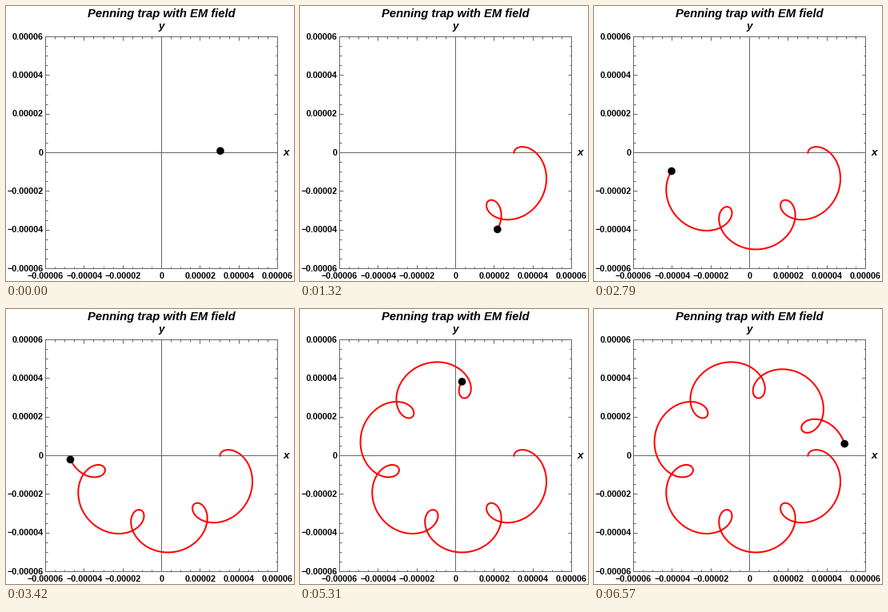
Animation of 360 by 344 pixels, one loop 6.6 s. Source, as a matplotlib script:

```python
import numpy as np
import matplotlib.pyplot as plt
from matplotlib.animation import FuncAnimation
from matplotlib.patches import Circle

W, H, DPI = 360, 344, 100
FRAMES, INTERVAL = 220, 30
X0, Y0, HALF = 194, 183, 145          # plot centre and half-size in pixels
ORIGIN = X0 + 0.62, Y0 + 0.62         # pixel centre of the crossing axes
GREY = "#666666"

# Magnetron drift plus the faster cyclotron motion
R_SLOW, R_FAST = 97.05, 24.25
W_SLOW, W_FAST = np.radians([1.6255, 1.6255 + 10.525])

plt.rcParams["font.family"] = "Liberation Sans"


def pt(px):
    return px * 72 / DPI


def orbit(t):
    """Pixel position of the particle at time t."""
    z = R_SLOW * np.exp(-1j * W_SLOW * t) - R_FAST * np.exp(-1j * W_FAST * t)
    return ORIGIN[0] + z.real, ORIGIN[1] - z.imag


fig = plt.figure(figsize=(W / DPI, H / DPI), dpi=DPI, facecolor="white")
ax = fig.add_axes([0, 0, 1, 1])
ax.set(xlim=(0, W), ylim=(H, 0))
ax.axis("off")


def line(x, y):
    ax.plot(x, y, color=GREY, lw=pt(1), solid_capstyle="butt", zorder=1)


def label(x, y, s, size, ha="center", style="normal"):
    ax.text(x, y, s, fontsize=pt(size), ha=ha, va="baseline",
            weight="bold", style=style, color="black")


L, R, T, B = X0 - HALF, X0 + HALF, Y0 - HALF, Y0 + HALF
line([L, R, R, L, L], [T, T, B, B, T])
line([L, R], [Y0, Y0])
line([X0, X0], [T, B])

for k in range(-12, 13):
    d = k * HALF / 12
    major = k % 4 == 0
    size = 4.5 if major else 2.5
    for edge, s in ((L, size), (R, -size)):
        line([edge, edge + s], [Y0 - d] * 2)
    for edge, s in ((T, size), (B, -size)):
        line([X0 + d] * 2, [edge, edge + s])
    if major:
        text = f"{k * 0.5e-5:.5f}".replace("-", "\u2212") if k else "0"
        label(X0 + 0.5 + d, 341, text, 10.67)
        label(46.9, Y0 - d + 3.8, text, 10.67, ha="right")

label(194, 14, "Penning trap with EM field", 14.8, style="italic")
label(194, 28.6, "y", 13.33, style="italic")
label(350.8, 187, "x", 13.33, style="italic")

trail, = ax.plot([], [], color="red", lw=pt(2), zorder=3)
dot = ax.add_patch(Circle(ORIGIN, 4.8, color="black", lw=0, zorder=4))


def draw(i):
    t = i + 1
    trail.set_data(*orbit(np.linspace(0, t, 8 * t + 1)))
    dot.center = orbit(t)
    return trail, dot


anim = FuncAnimation(fig, draw, frames=FRAMES, interval=INTERVAL,
                     repeat=True, repeat_delay=0)
plt.show()
```
